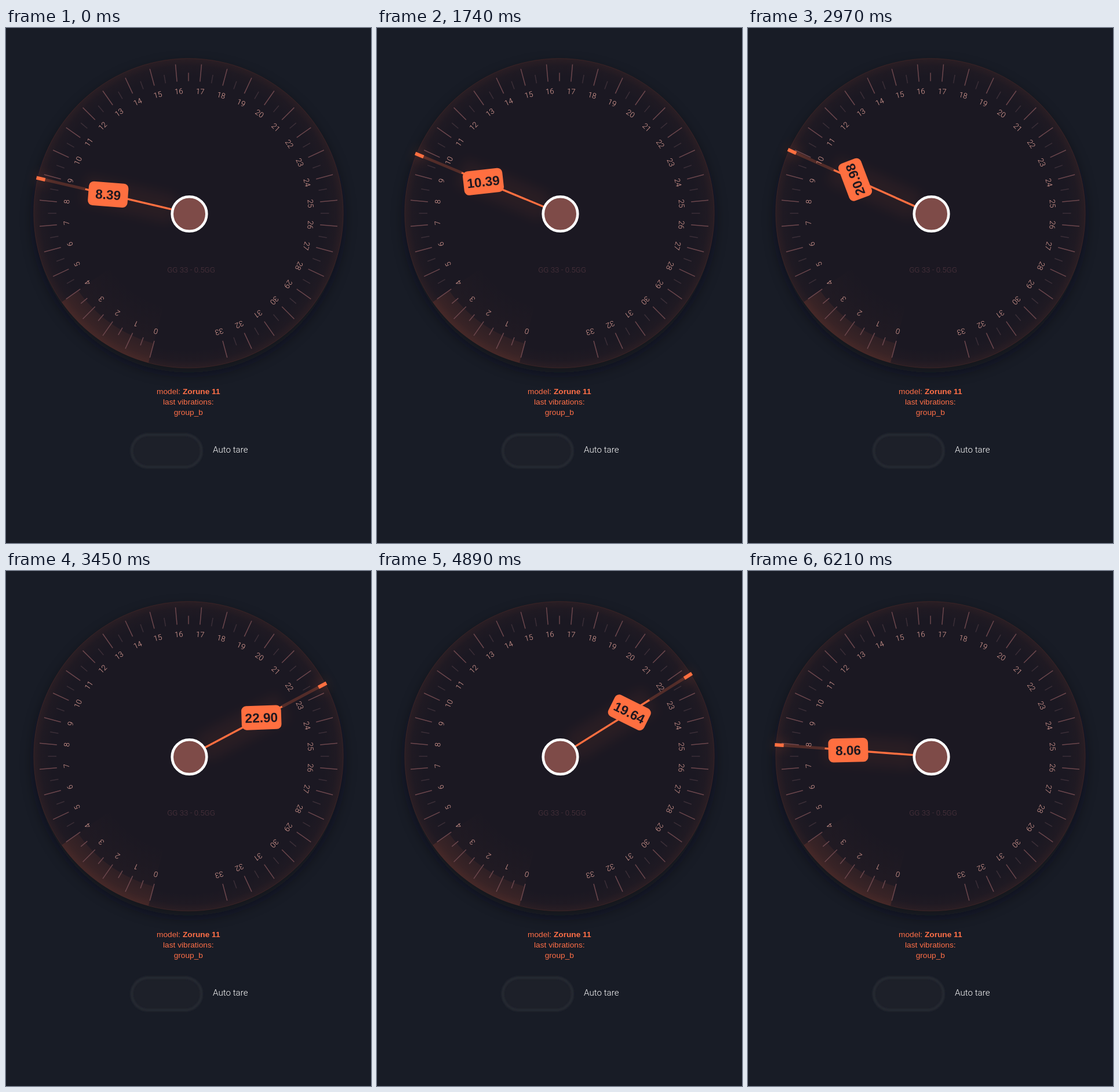
Recreate the animation shown at these times as an HTML page. Size 630 by 889 pixels, loop 6240 ms.

```html
<!DOCTYPE html>
<html lang="en">
<head>
<meta charset="utf-8">
<title>Gauge</title>
<style>
  html, body { margin: 0; width: 100%; height: 100%; overflow: hidden; background: #181c26; }
  svg { display: block; width: 630px; height: 889px; font-family: "Liberation Sans", Arial, sans-serif; }
  text { text-anchor: middle; }
  .light { font-family: Roboto, "Liberation Sans", sans-serif; font-weight: 300; }
</style>
</head>
<body>
<svg viewBox="0 0 630 889">
  <defs>
    <filter id="soft" x="-50%" y="-50%" width="200%" height="200%"><feGaussianBlur stdDeviation="12"/></filter>
    <filter id="glow" filterUnits="userSpaceOnUse" x="-80" y="-340" width="160" height="400"><feGaussianBlur stdDeviation="10"/></filter>
    <filter id="edge" x="-20%" y="-30%" width="140%" height="160%"><feGaussianBlur stdDeviation="1.8"/></filter>
    <radialGradient id="rim" gradientUnits="userSpaceOnUse" cx="0" cy="0" r="268">
      <stop offset=".88" stop-color="#ff6f40" stop-opacity="0"/>
      <stop offset=".95" stop-color="#ff6f40" stop-opacity=".02"/>
      <stop offset="1" stop-color="#ff6f40" stop-opacity=".07"/>
    </radialGradient>
    <radialGradient id="zone" gradientUnits="userSpaceOnUse" cx="0" cy="0" r="268">
      <stop offset=".6" stop-color="#ff6f40" stop-opacity="0"/>
      <stop offset=".865" stop-color="#ff6f40" stop-opacity=".025"/>
      <stop offset=".87" stop-color="#ff6f40" stop-opacity=".09"/>
      <stop offset="1" stop-color="#ff6f40" stop-opacity=".13"/>
    </radialGradient>
  </defs>

  <g transform="translate(315 319.8)">
    <circle cy="10" r="265" fill="#0b0d13" opacity=".6" filter="url(#soft)"/>
    <circle r="267.5" fill="#1b1822"/>
    <circle r="267.2" fill="url(#rim)" stroke="#ff6f40" stroke-opacity=".1"/>
    <path id="sector" fill="url(#zone)"/>
    <g id="scale" class="light" fill="#eaa79d" font-size="13"></g>
    <text class="light" x="4.5" y="102" font-size="13.3" fill="#50353f">GG 33 - 0.5GG</text>
    <g id="needle">
      <rect x="-25" y="-185" width="50" height="160" fill="#ff6f40" opacity=".06" filter="url(#glow)"/>
      <rect x="-9" y="-270" width="18" height="22" fill="#ff6f40" opacity=".13" filter="url(#glow)"/>
      <rect x="-2.5" y="-254" width="5" height="71" fill="#ff6f40" opacity=".24"/>
      <rect x="-3" y="-269.5" width="6" height="15.5" fill="#ff6f40"/>
      <rect x="-1.7" y="-183" width="3.4" height="160" fill="#ff6f40"/>
      <g id="badge">
        <rect x="-34.3" y="-20.7" width="68.6" height="41.4" rx="8.5" fill="#ff6f40"/>
        <text id="value" y="8.2" font-size="22.6" font-weight="700" fill="#1f1820"></text>
      </g>
    </g>
    <circle cx="1.5" cy="1.2" r="29.8" fill="#7e4b48" stroke="#fff" stroke-width="4.6"/>
  </g>

  <g font-size="13.7" fill="#ff6f47">
    <text x="314.8" y="632">model: <tspan font-weight="700">Zorune 11</tspan></text>
    <text x="314.8" y="650">last vibrations:</text>
    <text x="314.8" y="668">group_b</text>
  </g>
  <rect x="217" y="702" width="120.5" height="56" rx="28" fill="#1d2029"/>
  <rect x="217" y="702" width="120.5" height="56" rx="28" fill="none" stroke="#272933" stroke-width="4" filter="url(#edge)"/>
  <text class="light" x="387.3" y="733" font-size="15.2" fill="#fff">Auto tare</text>
</svg>

<script>
const LOOP = 6240;
const LAG = 150; // the needle trails behind the reading
const START = 9.26;
const MOVES = [ // start, duration, change of the reading
  [-440, 880, -1.74],
  [1120, 700, 2.98],
  [1820, 630, -1.9],
  [2774, 248, 13.9],
  [3022, 778, 0.7],
  [4607, 909, -15.34],
  [5900, 800, 0.6]
];

const $ = id => document.getElementById(id);
const angleOf = v => v * 10 - 165; // degrees clockwise from the top

function polar(v, r) {
  const a = angleOf(v) * Math.PI / 180;
  return `${Math.sin(a) * r} ${-Math.cos(a) * r}`;
}

function ease(u) {
  u = Math.min(1, Math.max(0, u));
  return u * u * (3 - 2 * u);
}

const reading = t => MOVES.reduce(
  (v, [start, duration, change]) => v + change * ease((t - start) / duration), START);

$('sector').setAttribute('d', `M0 0L${polar(0, 267)}A267 267 0 0 1 ${polar(4, 267)}Z`);

let marks = '';
for (let v = 0; v <= 33; v += 0.5) {
  const major = v % 1 === 0;
  const bright = major || v < 4 || v === 16.5;
  const turn = `transform="rotate(${angleOf(v)})"`;
  marks += `<path ${turn} d="M0-228V${major ? -258 : -242.5}" stroke="${bright ? '#6c474d' : '#3c2f38'}" stroke-width="1.5"/>`;
  if (major) marks += `<text ${turn} x="1.7" y="-206.7">${v}</text>`;
}
$('scale').innerHTML = marks;

function draw(t) {
  const v = reading(t);
  $('needle').setAttribute('transform', `rotate(${angleOf(reading(t - LAG))})`);
  // Upright only once the needle has caught up
  $('badge').setAttribute('transform', `translate(0 -142.4) rotate(${-angleOf(v)})`);
  $('value').textContent = v.toFixed(2);
}

const start = performance.now();
function tick() {
  draw((performance.now() - start) % LOOP);
  requestAnimationFrame(tick);
}
tick();
</script>
</body>
</html>
```
